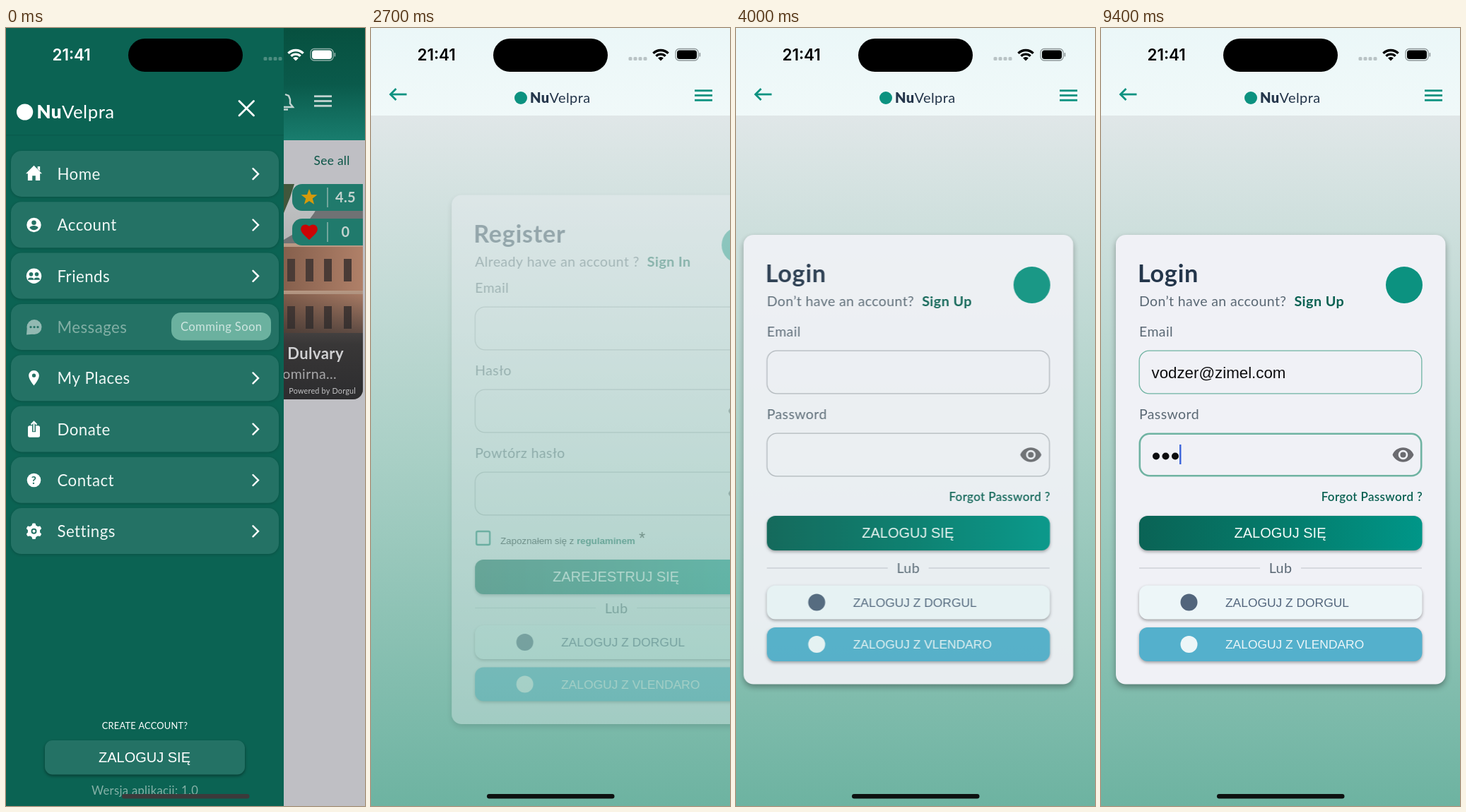
These frames come from a looping animation (508 by 1102 pixels, 9.5 s). An HTML page with a canvas:

```html
<!DOCTYPE html>
<html lang="pl">
<head>
<meta charset="utf-8">
<title>Login flow</title>
<style>
html, body { margin: 0; width: 100%; height: 100%; overflow: hidden; background: #dfe7e8; }
canvas { display: block; width: 100vw; height: 100vh; }
</style>
</head>
<body>
<canvas id="stage" width="508" height="1102"></canvas>
<script>
const W = 508, H = 1102, LOOP = 9500;
const stage = document.getElementById('stage').getContext('2d');
const layer = document.createElement('canvas');
layer.width = W;
layer.height = H;
const sheet = layer.getContext('2d');
let g = stage;

const UI = 'Lato, "Open Sans", sans-serif';
const ARIAL = '"Liberation Sans", Arial, sans-serif';
const TEAL = '#0c9280', DEEP = '#0a6152', INK = '#24364b', GREY = '#5a6874', SLATE = '#52657c';
const DRAWER = '#0b6353', ITEM = '#247265';
const EMAIL = 'vodzer@zimel.com';

const clamp = v => Math.max(0, Math.min(1, v));
const span = (t, from, length) => clamp((t - from) / length);
const easeOut = u => 1 - Math.pow(1 - u, 1.7);
const easeInOut = u => u * u * (3 - 2 * u);

function write(str, x, y, size, color, o = {}) {
  const font = o.font || UI;
  g.font = `${o.weight || 400} ${size}px ${font}`;
  g.letterSpacing = font === UI ? size * 0.02 + 'px' : '0px';
  g.textAlign = o.align || 'left';
  g.fillStyle = color;
  g.fillText(str, x, y);
  return g.measureText(str).width;
}

function box(x, y, w, h, r, fill, shadow) {
  g.save();
  if (shadow) {
    g.shadowColor = `rgba(0,0,0,${shadow[2]})`;
    g.shadowOffsetY = shadow[0];
    g.shadowBlur = shadow[1];
  }
  g.beginPath();
  g.roundRect(x, y, w, h, r);
  g.fillStyle = fill;
  g.fill();
  g.restore();
}

function frame(x, y, w, h, r, color, width) {
  g.beginPath();
  g.roundRect(x, y, w, h, r);
  g.strokeStyle = color;
  g.lineWidth = width;
  g.stroke();
}

function line(points, color, width, cap = 'butt') {
  g.beginPath();
  points.forEach(([x, y], i) => i ? g.lineTo(x, y) : g.moveTo(x, y));
  g.strokeStyle = color;
  g.lineWidth = width;
  g.lineCap = cap;
  g.stroke();
}

function shape(points, color) {
  g.beginPath();
  points.forEach(([x, y]) => g.lineTo(x, y));
  g.fillStyle = color;
  g.fill();
}

function disc(x, y, r, color) {
  g.beginPath();
  g.arc(x, y, r, 0, 7);
  g.fillStyle = color;
  g.fill();
}

function blend(x0, y0, x1, y1, colors) {
  const s = g.createLinearGradient(x0, y0, x1, y1);
  colors.forEach((c, i) => s.addColorStop(i / (colors.length - 1), c));
  return s;
}

// Icon paths live in a 24 x 24 box.
const icons = {
  home: new Path2D('M10 21v-6h4v6h5.5v-8.5H22L12 2.5 2 12.5h2.5V21zM16.5 3.5h3v6l-3-3z'),
  account: new Path2D('M12 2a10 10 0 1 0 0 20a10 10 0 1 0 0-20zm0 3.6a3.2 3.2 0 1 1 0 6.4a3.2 3.2 0 1 1 0-6.4zm0 13.6c-2.5 0-4.7-1.3-6-3.2 0-2 4-3.1 6-3.1s6 1.1 6 3.1c-1.3 1.9-3.5 3.2-6 3.2z'),
  pin: new Path2D('M12 1.5C8.1 1.5 5 4.7 5 8.5 5 14 12 22 12 22s7-8 7-13.5c0-3.8-3.1-7-7-7zm0 9.5a2.5 2.5 0 1 1 0-5a2.5 2.5 0 1 1 0 5z'),
  eye: new Path2D('M12 4.5C7 4.5 2.7 7.6 1 12c1.7 4.4 6 7.5 11 7.5s9.3-3.1 11-7.5c-1.7-4.4-6-7.5-11-7.5zM12 17a5 5 0 1 1 0-10a5 5 0 1 1 0 10zm0-8a3 3 0 1 0 0 6a3 3 0 1 0 0-6z'),
  heart: new Path2D('M12 21.3l-1.5-1.3C5.4 15.4 2 12.3 2 8.5 2 5.4 4.4 3 7.5 3c1.7 0 3.4.8 4.5 2.1C13.1 3.8 14.8 3 16.5 3 19.6 3 22 5.4 22 8.5c0 3.8-3.4 6.9-8.5 11.5z')
};

function icon(name, x, y, k, color) {
  g.save();
  g.translate(x - 12 * k, y - 12 * k);
  g.scale(k, k);
  g.fillStyle = color;
  g.fill(icons[name], 'evenodd');
  g.restore();
}

function radial(x, y, n, radius, color) {
  shape(Array.from({ length: n }, (_, i) => {
    const a = i / n * Math.PI * 2 - Math.PI / 2, r = radius(i);
    return [x + r * Math.cos(a), y + r * Math.sin(a)];
  }), color);
}

function brand(x, y, k, dot, ink) {
  disc(x + 9 * k, y, 9 * k, dot);
  const w = write('Nu', x + 22 * k, y + 7 * k, 20 * k, ink, { weight: 900 });
  write('Velpra', x + 22 * k + w, y + 7 * k, 20 * k, ink);
}

function burger(x, y, color) {
  for (let i = -1; i < 2; i++) line([[x, y + i * 6.8], [x + 25, y + i * 6.8]], color, 2.8);
}

function clock(color) {
  write('21:41', 65.5, 46, 22.4, color, { font: 'Inter, sans-serif', weight: 600 });
  box(173, 15, 162, 47, 23.5, '#000');
}

function dots(color) {
  for (let i = 0; i < 4; i++) box(364.5 + i * 7, 41, 5, 5, 1.5, color);
}

function signals(color, rim) {
  g.lineCap = 'butt';
  g.strokeStyle = color;
  [[15, 3.4], [9.3, 3.3], [3, 5]].forEach(([r, w]) => {
    g.beginPath();
    g.arc(410, 46.5, r, -Math.PI * 0.75, -Math.PI * 0.25);
    g.lineWidth = w;
    g.stroke();
  });
  frame(431, 29.5, 32, 16.5, 5, rim, 1.3);
  box(433, 31.5, 28, 12.5, 3.5, color);
  box(464.5, 35, 1.7, 5.5, 1, rim);
}

function badge(y, label) {
  box(405, y, 100, 38, [14, 0, 0, 14], '#207a6c');
  line([[455, y + 5], [455, y + 33]], '#a9c3bd', 1.2);
  write(label, 480.5, y + 26, 20, '#c3d3cf', { align: 'center', weight: 700 });
}

function photo() {
  g.save();
  g.beginPath();
  g.roundRect(300, 221, 205, 305, 14);
  g.clip();
  g.fillStyle = blend(0, 221, 0, 300, ['#c3c6c8', '#b4b5b5']);
  g.fillRect(300, 221, 205, 305);
  shape([[393, 221], [408, 221], [402, 240], [393, 262]], '#41573c');
  shape([[393, 300], [420, 284], [436, 262], [448, 240], [505, 240], [505, 330], [393, 320]], '#6f7274');
  g.fillStyle = blend(393, 0, 505, 0, ['#86604d', '#b08068']);
  g.fillRect(390, 308, 115, 130);
  g.fillStyle = '#b99a85';
  [305, 372].forEach(y => g.fillRect(390, y, 115, 5));
  g.fillStyle = '#4a3b36';
  [327, 394].forEach(y => [398, 424, 450, 478].forEach(x => g.fillRect(x, y, 11, 32)));
  g.fillStyle = '#6b645f';
  g.fillRect(390, 432, 115, 94);
  g.fillStyle = blend(0, 370, 0, 526, ['rgba(40,40,42,0)', 'rgba(40,40,42,.75)', '#2d2d2f']);
  g.fillRect(300, 370, 205, 156);
  g.restore();
}

function homePage() {
  g.fillStyle = '#bfbfc4';
  g.fillRect(0, 0, W, H);
  g.fillStyle = blend(0, 0, 0, 159, ['#07503f', '#0a5a4b', '#197d6e']);
  g.fillRect(0, 0, W, 159);
  burger(436, 103.5, '#c1d3d0');
  line([[384, 112], [406, 112], [402, 107], [402, 101], [400, 96], [395, 94]], '#c1d3d0', 2.4);
  line([[393, 115.5], [399, 115.5]], '#c1d3d0', 2.5);
  write('See all', 435.5, 194, 17.3, '#0b5547');
  photo();
  badge(221, '4.5');
  radial(429, 240, 10, i => i % 2 ? 5 : 12, '#d59a0b');
  badge(270, '0');
  icon('heart', 429, 289, 1.18, '#cb0505');
  write('Dom Dulvary', 478, 469, 22, '#d0d0d2', { align: 'right', weight: 700 });
  write('ul. Walomirna...', 468, 497, 19.5, '#a8a8aa', { align: 'right' });
  write('Powered by Dorgul', 495, 518, 10.8, '#c4c4c6', { align: 'right' });
}

const MARK_X = 39.5;

function friends(y) {
  disc(MARK_X, y, 10.7, '#fff');
  [-1, 1].forEach(side => {
    disc(MARK_X + side * 4, y - 2.5, 2.8, ITEM);
    g.beginPath();
    g.ellipse(MARK_X + side * 4.3, y + 5.5, 4.2, 3.4, 0, Math.PI, 0);
    g.fill();
  });
}

function bubble(y) {
  const fill = '#92b9b2';
  disc(40, y, 10.5, fill);
  shape([[30, y - 1], [29, y + 11], [40, y + 10]], fill);
  for (let i = -1; i < 2; i++) disc(40 + i * 5, y, 1.6, ITEM);
}

function donate(y) {
  box(31, y - 5, 17, 16.5, 2.5, '#fff');
  line([[MARK_X, y + 4], [MARK_X, y - 6]], ITEM, 5);
  line([[MARK_X, y + 3], [MARK_X, y - 9]], '#fff', 2);
  line([[35.5, y - 6.5], [MARK_X, y - 10.5], [43.5, y - 6.5]], '#fff', 2);
}

function help(y) {
  disc(MARK_X, y, 9.8, '#fff');
  write('?', MARK_X, y + 5.5, 15.5, ITEM, { align: 'center', weight: 700 });
}

function gear(y) {
  const tooth = i => clamp(0.5 + 2 * Math.cos(i / 6 * Math.PI));
  radial(MARK_X, y, 72, i => 8.6 + 2.7 * tooth(i), '#fff');
  disc(MARK_X, y, 4, ITEM);
  disc(MARK_X, y, 2, '#fff');
}

const menu = [
  ['Home', y => icon('home', MARK_X, y - 1, 1.15, '#fff')],
  ['Account', y => icon('account', MARK_X, y, 1.02, '#fff')],
  ['Friends', friends],
  ['Messages', bubble],
  ['My Places', y => icon('pin', MARK_X, y, 1.05, '#fff')],
  ['Donate', donate],
  ['Contact', help],
  ['Settings', gear]
];

function drawer() {
  g.fillStyle = DRAWER;
  g.fillRect(0, 0, 393, H);
  g.fillStyle = 'rgba(0,50,40,.15)';
  g.fillRect(0, 151, 393, 1.5);
  brand(15, 119, 1.29, '#fff', '#fff');
  line([[330, 103.5], [350.5, 124]], '#fff', 2.8, 'round');
  line([[350.5, 103.5], [330, 124]], '#fff', 2.8, 'round');

  menu.forEach(([label, mark], i) => {
    const y = 174 + i * 72.3, mid = y + 32.7, off = label === 'Messages';
    box(7, y, 379, 65, 15, ITEM, [1, 4, 0.2]);
    mark(mid);
    write(label, 72.5, y + 41, 22.3, off ? '#82afa5' : '#f0f8f6');
    if (off) {
      box(234, y + 12, 141, 39.5, 14, '#6bb19f');
      write('Comming Soon', 247, y + 38, 16.7, '#cde5df');
    } else {
      line([[349.5, mid - 7.5], [357, mid], [349.5, mid + 7.5]], '#fff', 2.4, 'round');
    }
  });

  write('CREATE ACCOUNT?', 196.5, 993, 12.8, '#fff', { align: 'center' });
  box(55, 1009, 283, 48.5, 11, ITEM, [2, 4, 0.4]);
  write('ZALOGUJ SIĘ', 196, 1040, 20, '#fff', { align: 'center', font: ARIAL });
  write('Wersja aplikacji: 1.0', 196.5, 1086, 16.6, '#85b1a7', { align: 'center' });
}

function formPage() {
  g.fillStyle = blend(0, 124, 0, H, ['#e0e7e8', '#a8cfc5', '#6db3a1']);
  g.fillRect(0, 0, W, H);
  g.fillStyle = blend(0, 0, 0, 124, ['#ebf7f8', '#f0f9f9']);
  g.fillRect(0, 0, W, 124);
  line([[50.5, 94], [28, 94]], TEAL, 2.8);
  line([[35.5, 86], [27.5, 94], [35.5, 102]], TEAL, 2.8);
  brand(203, 99, 1, TEAL, INK);
  burger(458, 95.5, TEAL);
}

function field(y, focus, filled, eye) {
  const w = 1.3 + 1.3 * focus;
  frame(53.5 + w / 2, y + w / 2, 401 - w, 62 - w, 14, focus > 0.1 || filled ? '#6fb3a2' : '#b2b6bb', w);
  if (eye) icon('eye', 427.5, y + 31, 1.36, '#6b6b70');
}

function cardTop(y, h, title, ask, link) {
  box(21, y, 466.5, h, 14, '#f0f1f6', [4, 8, 0.35]);
  write(title, 52, y + 67, 34.3, INK, { weight: 700 });
  const w = write(ask, 54, y + 101, 19.5, GREY);
  write(link, 54 + w + 11, y + 101, 19.8, DEEP, { weight: 700 });
  disc(429, y + 71, 26, TEAL);
}

function buttons(y, label, lub) {
  box(54, y, 400.5, 49, 12, blend(54, 0, 454, 0, ['#0a6355', '#047b6b', '#009688']), [2, 4, 0.35]);
  write(label, 253.5, y + 31, 20, '#f2faf8', { align: 'center', font: ARIAL });
  line([[54, lub], [225, lub]], '#cfd2d7', 1.3);
  line([[283, lub], [454, lub]], '#cfd2d7', 1.3);
  write('Lub', 254, lub + 7, 19.7, GREY, { align: 'center' });
  [[24.5, '#edf6f8', SLATE, 'DORGUL'], [84, '#54b0cc', '#edf6f8', 'VLENDARO']].forEach(([dy, fill, ink, name]) => {
    box(54, lub + dy, 400.5, 48, 12, fill, [2, 4, 0.35]);
    disc(124.5, lub + dy + 24, 12, ink);
    write('ZALOGUJ Z ' + name, 176, lub + dy + 30, 17.4, ink, { font: ARIAL });
  });
}

// Time of a key press and the number of characters shown from then on.
const keys = [[5300, 1], [5400, 2], [5500, 3], [5700, 4], [5900, 5], [6000, 6], [6400, 7], [6700, 8], [6900, 10], [7000, 13], [7100, 16]];
const secretKeys = [8700, 8900, 9200];

function caret(x, y, t) {
  const times = [4400, 7600, ...keys.map(k => k[0]), ...secretKeys];
  const idle = (t - Math.max(...times.filter(k => k <= t))) % 1000;
  g.globalAlpha = 1 - span(idle, 500, 150) + span(idle, 800, 150);
  g.fillStyle = '#4168dc';
  g.fillRect(x, y, 2.5, 28);
  g.globalAlpha = 1;
}

function loginCard(t) {
  cardTop(293, 636.5, 'Login', 'Don’t have an account?', 'Sign Up');
  write('Email', 54, 437, 19.5, GREY);
  write('Password', 54, 554, 19.5, GREY);
  const typed = keys.reduce((n, [at, count]) => t >= at ? count : n, 0);
  const away = span(t, 7580, 150);
  field(456.5, span(t, 4380, 150) * (1 - away), typed > 0, false);
  field(573.5, away, false, true);
  const w = write(EMAIL.slice(0, typed), 71.5, 496, 22.3, '#0c0c0e', { font: ARIAL });
  const secret = secretKeys.filter(at => t >= at).length;
  for (let i = 0; i < secret; i++) disc(78 + i * 13.5, 606.5, 5, '#0c0c0e');
  if (t >= 7600) caret(72 + secret * 13, 590, t);
  else if (t >= 4400) caret(72 + w, 474, t);
  write('Forgot Password ?', 455, 670, 17, DEEP, { align: 'right', weight: 600 });
  buttons(691, 'ZALOGUJ SIĘ', 765);
}

function registerCard() {
  cardTop(236.5, 749.5, 'Register', 'Already have an account ?', 'Sign In');
  [['Email', 394.5], ['Hasło', 511.5], ['Powtórz hasło', 628.5]].forEach(([label, y], i) => {
    write(label, 54, y - 19.5, 19.5, GREY);
    field(y, 0, false, i > 0);
  });
  frame(56, 713, 19, 19, 2, '#0f7d6d', 2.4);
  const w = write('Zapoznałem się z ', 90, 731, 13.3, '#161b20', { font: ARIAL });
  write('regulaminem', 90 + w, 731, 13.3, DEEP, { font: ARIAL, weight: 700 });
  write('*', 286, 731, 23, '#222', { font: ARIAL });
  buttons(753, 'ZAREJESTRUJ SIĘ', 821.5);
}

function place(draw, t, shift, alpha) {
  if (alpha <= 0) return;
  g = sheet;
  g.clearRect(0, 0, W, H);
  draw(t);
  g = stage;
  g.globalAlpha = alpha;
  g.drawImage(layer, shift, 0);
  g.globalAlpha = 1;
}

function enter(draw, t, at, side) {
  const p = easeOut(span(t, at, 380));
  place(draw, t, side * 140 * (1 - p), p);
}

function leave(draw, t, at, side) {
  const p = easeOut(span(t, at, 280));
  place(draw, t, side * 140 * p, 1 - p);
}

function cards(t) {
  if (t < 2290) enter(loginCard, t, 1420, -1);
  else if (t < 2620) leave(loginCard, t, 2290, 1);
  else if (t < 3440) enter(registerCard, t, 2620, 1);
  else if (t < 3720) leave(registerCard, t, 3440, -1);
  else enter(loginCard, t, 3703, -1);
}

function render(t) {
  g = stage;
  const open = 1 - easeInOut(span(t, 1190, 400));
  const home = t < 1190;
  if (home) {
    homePage();
    signals('#fff', '#8fb0a9');
  } else {
    formPage();
    cards(t);
    signals('#000', '#8e9799');
    g.fillStyle = `rgba(0,0,0,${0.25 * open})`;
    g.fillRect(0, 0, W, H);
  }
  if (open > 0) {
    g.save();
    g.translate(-393 * (1 - open), 0);
    drawer();
    g.restore();
  }
  dots(home ? '#4c8c7f' : '#b9c3c5');
  clock(open > 0.5 ? '#fff' : '#000');
  box(164, 1085, 180.5, 6.5, 3.2, home ? '#3c3a3b' : '#0d1110');
}

function tick() {
  render(performance.now() % LOOP);
  requestAnimationFrame(tick);
}
tick();
</script>
</body>
</html>
```
